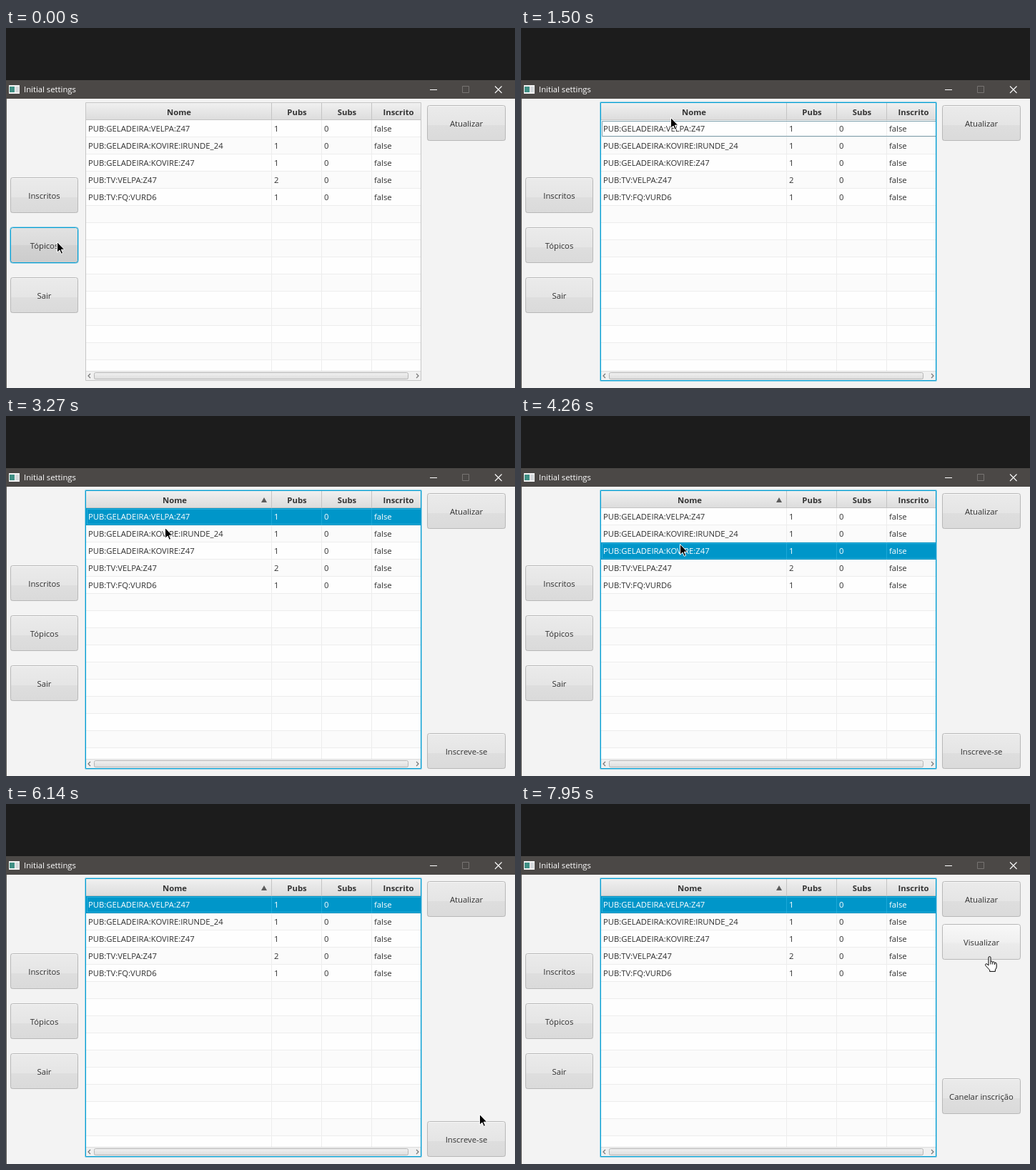
Recreate the animation shown at these times as an HTML page with a canvas. Size 712 by 504 pixels, loop 8 s.

```html
<!DOCTYPE html>
<html lang="pt">
<head>
<meta charset="utf-8">
<title>Initial settings</title>
<style>
html, body { margin: 0; width: 100%; height: 100%; overflow: hidden; background: #1c1c1c; }
canvas { display: block; width: 712px; height: 504px; }
</style>
</head>
<body>
<canvas id="stage" width="712" height="504"></canvas>
<script>
const ctx = document.getElementById('stage').getContext('2d');
const LOOP = 8000;
const FAMILY = '"Open Sans", "Noto Sans", sans-serif';
const BLUE = '#039ed3';
const INK = '#303030';

const ROWS = [
  ['PUB:GELADEIRA:VELPA:Z47', '1'],
  ['PUB:GELADEIRA:KOVIRE:IRUNDE_24', '1'],
  ['PUB:GELADEIRA:KOVIRE:Z47', '1'],
  ['PUB:TV:VELPA:Z47', '2'],
  ['PUB:TV:FQ:VURD6', '1']
];
const COLUMNS = [371, 441, 511];
const ROW_TOP = 129, ROW_H = 24;

// Pointer moves: start time, number of 60 ms steps, end position
const TICK = 60;
const START = [71, 299];
const MOVES = [
  [650, 10, 209, 125],
  [2180, 5, 207, 140],
  [3030, 5, 222, 156],
  [3830, 4, 222, 179],
  [4510, 3, 239, 157],
  [4870, 3, 249, 140],
  [5480, 5, 668, 411],
  [5900, 5, 662, 434],
  [6200, 4, 636, 452],
  [6440, 4, 644, 451],
  [7410, 10, 654, 213]
];

const ARROW = new Path2D('M.5 .5V15.2L4 12L6.3 17.3L8.6 16.3L6.3 11.2H10.8Z');
const HAND = new Path2D('M5 13V2Q5 .6 6.5 .6T8 2V7.5Q9.6 6.4 10.8 8.2Q12.6 7.2 13.6 9' +
  'Q16.2 8.6 16.2 11V15Q16.2 17 14.4 19V21.4H6.6V19.4L1.2 13.6Q-.2 11.4 1.4 10.7Q2.8 10.4 5 13Z');
const KNUCKLES = new Path2D('M8 7.5V11.5M10.8 8.2V11.5M13.6 9V12');

function fill(x, y, w, h, color) {
  ctx.fillStyle = color;
  ctx.fillRect(x, y, w, h);
}

function frame(x, y, w, h, color, r = 0) {
  ctx.strokeStyle = color;
  ctx.lineWidth = 1;
  ctx.beginPath();
  ctx.roundRect(x + 0.5, y + 0.5, w - 1, h - 1, r);
  ctx.stroke();
}

function line(points, color, width = 1) {
  ctx.strokeStyle = color;
  ctx.lineWidth = width;
  ctx.beginPath();
  points.forEach(([x, y]) => ctx.lineTo(x, y));
  ctx.stroke();
}

function text(s, x, y, color = INK, align = 'left', weight = 400) {
  ctx.font = `${weight} 11.3px ${FAMILY}`;
  ctx.fillStyle = color;
  ctx.textAlign = align;
  ctx.fillText(s, x, y);
}

function shade(y, h, stops) {
  const g = ctx.createLinearGradient(0, y, 0, y + h);
  stops.forEach(([at, color]) => g.addColorStop(at, color));
  return g;
}

const LOOKS = {
  normal: [[0, '#ebebeb'], [0.55, '#e5e5e5'], [0.56, '#dedede'], [1, '#dadada']],
  pressed: [[0, '#e2e2e2'], [0.5, '#dadada'], [0.51, '#d2d2d2'], [1, '#cccccc']],
  light: [[0, '#f8f8f8'], [0.5, '#f0f0f0'], [0.56, '#ebebeb'], [1, '#e6e6e6']]
};

function button(label, x, y, w, look = 'normal', focused = false) {
  const h = 50;
  ctx.fillStyle = shade(y, h, LOOKS[look]);
  ctx.beginPath();
  ctx.roundRect(x, y, w, h, 3);
  ctx.fill();
  if (!focused) fill(x + 2, y + 1, w - 4, 1, '#f7f7f7');
  if (focused) frame(x - 1, y - 1, w + 2, h + 2, 'rgba(3,158,211,.35)', 4);
  frame(x, y, w, h, focused ? BLUE : '#b8b8b8', 3);
  text(label, x + w / 2, y + 30, INK, 'center');
}

function windowFrame() {
  fill(0, 0, 712, 504, '#1c1c1c');
  fill(0, 73, 712, 26, '#4b4846');
  fill(0, 99, 712, 405, '#f3f3f3');
  fill(0, 99, 1, 405, '#5a5856');

  fill(4, 80, 15, 12, '#f4f4f4');
  fill(5, 82, 7, 8, '#3f8f84');
  fill(13, 82, 5, 8, '#d5d9dc');
  text('Initial settings', 25, 90, '#ffffff');

  fill(593, 86, 10, 1, '#ffffff');
  frame(638, 81, 10, 10, '#777472');
  line([[684, 81.5], [693.5, 91]], '#ffffff', 1.1);
  line([[693.5, 81.5], [684, 91]], '#ffffff', 1.1);
}

function header(sorted) {
  fill(112, 105, 468, 24, shade(105, 24, [[0, '#f0f0f0'], [1, '#dcdcdc']]));
  fill(112, 128, 468, 1, '#c4c4c4');
  COLUMNS.forEach(x => fill(x, 105, 1, 24, '#c4c4c4'));
  const names = [['Nome', sorted ? 236 : 242], ['Pubs', 407], ['Subs', 477], ['Inscrito', 549]];
  names.forEach(([s, x]) => text(s, x, 122, '#333333', 'center', 700));
  if (sorted) {
    ctx.fillStyle = '#5c5c5c';
    ctx.beginPath();
    ctx.moveTo(361, 114);
    ctx.lineTo(365, 121);
    ctx.lineTo(357, 121);
    ctx.fill();
  }
}

function tableRow(i, state) {
  const y = ROW_TOP + i * ROW_H;
  const active = state.row === i && state.tableFocus;
  const idle = state.row === i && !state.tableFocus;
  const bg = active ? '#0096c9' : idle ? '#d3d3d3' : i % 2 ? '#fbfbfb' : '#fefefe';
  const rule = active ? '#1ba8d8' : idle ? '#c9c9c9' : '#ededed';
  fill(112, y, 468, ROW_H, bg);
  fill(112, y + ROW_H - 1, 468, 1, active ? '#0089b8' : rule);
  COLUMNS.forEach(x => fill(x, y, 1, ROW_H, rule));
  if (active) frame(113, y + 1, 468, ROW_H - 2, '#2aaedb');
  if (i === 0 && state.row < 0 && state.tableFocus) frame(113, y + 1, 468, ROW_H - 2, '#7d9fac');

  if (!ROWS[i]) return;
  const [name, pubs] = ROWS[i];
  const color = active ? '#ffffff' : INK;
  [[name, 115], [pubs, 375], ['0', 445], ['false', 515]]
    .forEach(([s, x]) => text(s, x, y + 16, color));
}

function scrollBar() {
  fill(112, 480, 468, 13, '#f0f0f0');
  fill(112, 480, 468, 1, '#dddddd');
  ctx.fillStyle = shade(482, 10, [[0, '#f2f2f2'], [1, '#dcdcdc']]);
  ctx.beginPath();
  ctx.roundRect(123, 482, 440, 10, 2);
  ctx.fill();
  frame(123, 482, 440, 10, '#b6b6b6', 2);
  line([[118, 484], [115, 487], [118, 490]], '#777777', 1.2);
  line([[574, 484], [577, 487], [574, 490]], '#777777', 1.2);
}

function table(state) {
  ctx.save();
  ctx.beginPath();
  ctx.rect(112, 105, 468, 388);
  ctx.clip();
  for (let i = 0; i < 15; i++) tableRow(i, state);
  header(state.sorted);
  scrollBar();
  ctx.restore();
  if (state.tableFocus) frame(110, 103, 472, 392, 'rgba(3,158,211,.4)', 1);
  frame(111, 104, 470, 390, state.tableFocus ? BLUE : '#c6c6c6');
}

function pointerAt(t) {
  let [x, y] = START;
  for (const [start, steps, toX, toY] of MOVES) {
    if (t < start) break;
    const p = Math.min(1, (Math.floor((t - start) / TICK) + 1) / steps);
    const e = p * p * (3 - 2 * p);
    x += (toX - x) * e;
    y += (toY - y) * e;
  }
  return [Math.round(x), Math.round(y)];
}

function pointer(t, subscribed) {
  const [x, y] = pointerAt(t);
  const over = top => y >= top && y < top + 50;
  const hand = x > 589 && (subscribed ? over(384) || over(168) : over(444));
  ctx.save();
  ctx.translate(hand ? x - 5 : x, y);
  ctx.lineJoin = 'round';
  ctx.lineWidth = 1;
  ctx.fillStyle = hand ? '#ffffff' : '#000000';
  ctx.strokeStyle = hand ? '#000000' : '#ffffff';
  const shape = hand ? HAND : ARROW;
  ctx.fill(shape);
  ctx.stroke(shape);
  if (hand) ctx.stroke(KNUCKLES);
  ctx.restore();
}

function selectedRow(t) {
  if (t < 2600) return -1;
  if (t < 3520) return 0;
  if (t < 4260) return 1;
  return t < 5170 ? 2 : 0;
}

function draw(t) {
  const pressing = t >= 6920 && t < 7040;
  const subscribed = t >= 7040;
  windowFrame();
  button('Inscritos', 6, 209, 95);
  button('Tópicos', 6, 279, 95, t < 60 ? 'pressed' : 'normal', t < 1500);
  button('Sair', 6, 349, 95);
  button('Atualizar', 589, 108, 110);
  if (subscribed) {
    button('Visualizar', 589, 168, 110, 'light');
    button('Canelar inscrição', 589, 384, 110);
  } else if (t >= 2720) {
    button('Inscreve-se', 589, 444, 110, pressing ? 'pressed' : 'normal', pressing);
  }
  table({
    row: selectedRow(t),
    sorted: t >= 2060,
    tableFocus: t >= 1500 && !pressing
  });
  pointer(t, subscribed);
}

const begin = performance.now();
function tick() {
  draw((performance.now() - begin) % LOOP);
  requestAnimationFrame(tick);
}
tick();
</script>
</body>
</html>
```
